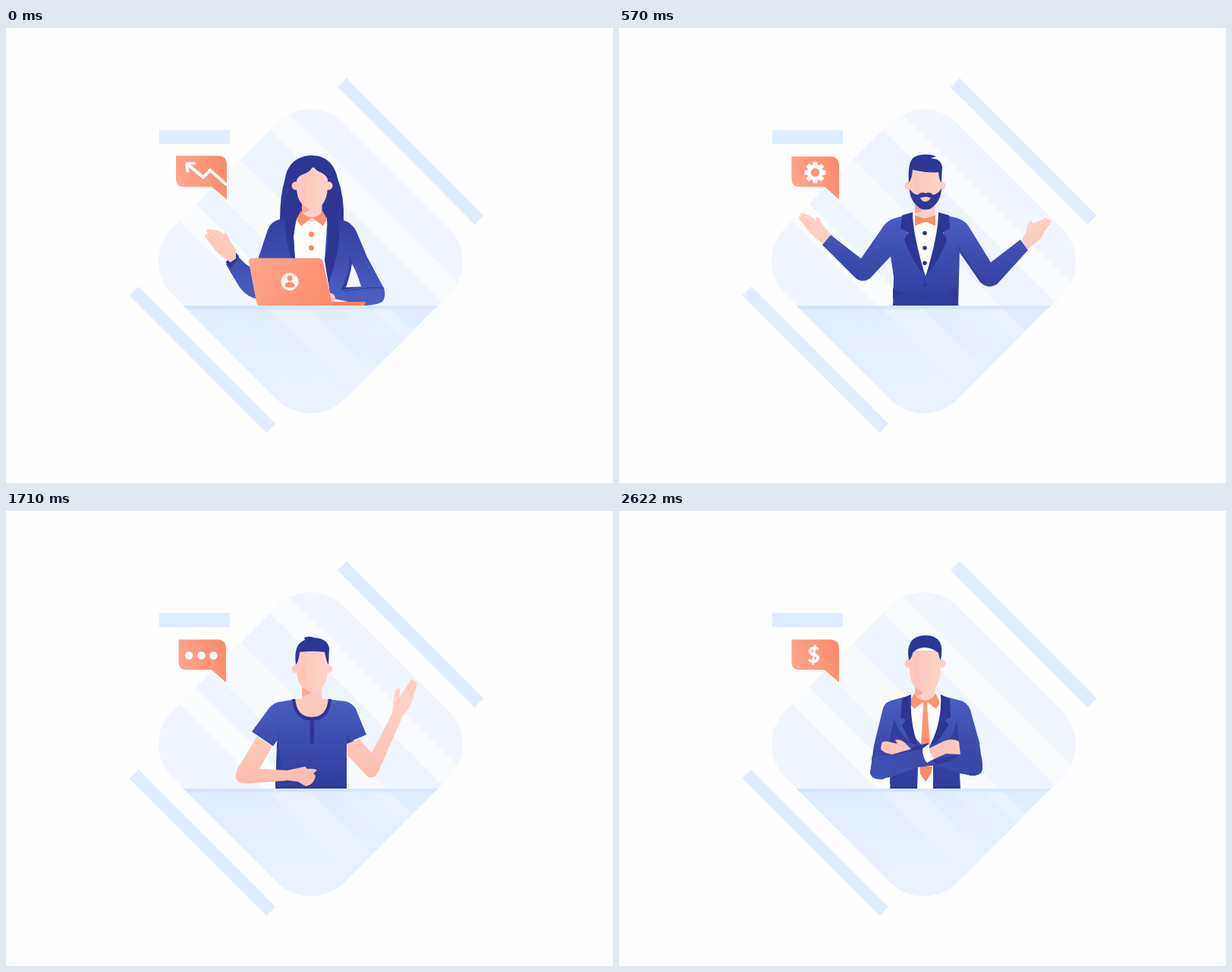
Write an HTML page with a canvas that moves like this. It is 800 by 600 pixels and loops after 2850 ms.

```html
<!DOCTYPE html>
<html lang="en">
<head>
<meta charset="utf-8">
<title>Desk people</title>
<style>
html, body { margin: 0; width: 100%; height: 100%; overflow: hidden; background: #fefefe; }
canvas { display: block; }
</style>
</head>
<body>
<canvas id="stage" width="800" height="600"></canvas>
<script>
const ctx = document.getElementById('stage').getContext('2d');
const HOLD = 570;
const WHITE = '#fefefe', NAVY = '#2e3694', PALE = '#e0edfe';
const DESK_Y = 366;

function grad(x0, y0, c0, x1, y1, c1) {
  const g = ctx.createLinearGradient(x0, y0, x1, y1);
  g.addColorStop(0, c0);
  g.addColorStop(1, c1);
  return g;
}

const blue = grad(0, 245, '#4b5fc0', 0, 366, '#2f3a9b');
const blueUp = grad(0, 250, '#343d9e', 0, 366, '#4d62c5');
const hair = grad(0, 165, '#2b3796', 0, 250, '#303693');
const skin = grad(383, 0, '#fdc6b9', 424, 0, '#fed4cb');
const shade = grad(384, 0, '#fdccc1', 402, 0, '#fcbfb0');
const arm = grad(0, 250, '#fed2c8', 0, 355, '#fdbfae');
const orange = grad(0, 240, '#ff9a78', 0, 366, '#fa8766');
const laptop = grad(320, 304, '#ffa98f', 430, 366, '#fc8968');
const bubbleFill = grad(228, 208, '#ffa78f', 290, 180, '#fb8a6a');
const desk = grad(0, 371, '#e0edfd', 0, 508, '#ebf3fe');
const deskGlow = grad(0, 371, '#e8f1fd', 0, 480, '#f3f8fe');

function fill(color, d) {
  ctx.fillStyle = color;
  ctx.fill(new Path2D(d));
}

function line(color, width, d, cap = 'round') {
  ctx.strokeStyle = color;
  ctx.lineWidth = width;
  ctx.lineCap = cap;
  ctx.lineJoin = cap === 'round' ? 'round' : 'miter';
  ctx.stroke(new Path2D(d));
}

function dots(color, r, ...points) {
  ctx.fillStyle = color;
  for (const [x, y] of points) {
    ctx.beginPath();
    ctx.arc(x, y, r, 0, Math.PI * 2);
    ctx.fill();
  }
}

// Diagonal stripe between two values of x - y
function stripe(color, from, to) {
  ctx.save();
  ctx.translate(401.5, 307.5);
  ctx.rotate(Math.PI / 4);
  ctx.fillStyle = color;
  ctx.fillRect(-230, (94 - to) / Math.SQRT2, 460, (to - from) / Math.SQRT2);
  ctx.restore();
}

function clipDiamond() {
  const half = 160;
  ctx.translate(401.5, 307.5);
  ctx.rotate(Math.PI / 4);
  ctx.beginPath();
  ctx.roundRect(-half, -half, half * 2, half * 2, 62);
  ctx.rotate(-Math.PI / 4);
  ctx.translate(-401.5, -307.5);
  ctx.clip();
}

function drawBackdrop() {
  ctx.fillStyle = WHITE;
  ctx.fillRect(0, 0, 800, 600);
  fill(PALE, 'M202 134.5H295V153H202ZM449 66L629.500 247 617.500 259 437 78ZM174.500 341L355 522 343.500 534 162.500 352.500Z');
  ctx.save();
  clipDiamond();
  ctx.fillStyle = '#f1f6fe';
  ctx.fillRect(190, 100, 430, 420);
  stripe('#f9fbfe', 213, 260);
  stripe('#eff5fe', 135, 213);
  stripe('#f8fafe', 60, 135);
  stripe('#eff5fe', 18, 60);
  stripe('#fafcfe', -26, 18);
  ctx.restore();
}

function drawDesk() {
  ctx.save();
  clipDiamond();
  ctx.beginPath();
  ctx.rect(190, DESK_Y, 430, 150);
  ctx.clip();
  ctx.fillStyle = desk;
  ctx.fillRect(190, DESK_Y, 430, 150);
  stripe(deskGlow, -25, 30);
  stripe('#e5effd', 69, 112);
  stripe('#e9f2fd', 112, 136);
  ctx.fillStyle = grad(234, 0, '#d5e4fa', 569, 0, '#dbe9fc');
  ctx.fillRect(190, DESK_Y, 430, 5);
  ctx.restore();
}

function drawBubble(left = 227.5, top = 169.5, right = 290) {
  fill(bubbleFill, `M${left} ${top}H${right - 12}Q${right} ${top} ${right} ${top + 12}V226L271 209.500H${left + 11}Q${left} 209.500 ${left} 199Z`);
}

function drawHead(earY = 208) {
  dots('#fdc9bd', 5.5, [382, earY]);
  dots('#fed1c7', 5.5, [425, earY]);
  fill('#fed0c6', 'M390 225H416.500V252Q403 262 390 252Z');
  fill('#fca992', 'M390 229L401 239Q396 244 390 244Z');
  fill(skin, 'M384 184H424V211Q423 226 416 234Q409 241 401 239Q391 236 386 226Q383 219 383 208Z');
  fill(shade, 'M384 186H396Q390 194 392 202L396 212Q397 223 390 231Q383 222 383 208Z');
}

function drawCollar() {
  fill('#fd936f', 'M389 241Q384 248 383.500 254L389 261 403.500 250 418 261 422.500 253Q421 246 417 241Q413 249 403.500 250Q393 249 389 241Z');
}

function womanWithLaptop() {
  drawBubble(224, 168.5, 291);
  line(WHITE, 4, 'M239 179.500L260 197 269 187.500 291 207', 'butt');
  line(WHITE, 3.6, 'M239.500 189L238 178.500 248.500 178.500');

  fill(hair, 'M361 254Q361 220 368 198C371 178 386 168 403 168C421 168 433 179 437 198Q446 222 445 254Z');
  drawHead();
  fill(hair, 'M382 203V184L405 172 425 184V203Q423 194 416 191Q407 188 405 181Q402 189 394 192Q385 194 382 203Z');
  fill(WHITE, 'M382 249L403 256 424 249 430 306H379Z');
  drawCollar();
  dots('#fb845f', 3.4, [402.5, 272], [402.5, 290]);

  fill(blueUp, 'M383 248L362 252Q350 254 345 266L331 308H381L379 275Z');
  fill(blueUp, 'M424 248L443 253Q457 257 462 269L476 302 498 343Q501 352 497 360Q492 365 473 366L428 356 420 306Z');
  fill(NAVY, 'M368 251L385 247Q379 262 379 276L381 305H376Q367 276 368 251Z');
  fill(NAVY, 'M422 247L438 252Q441 272 437 294Q432 319 425 336L420 306Q428 276 422 247Z');
  fill('#333b9b', 'M455 280Q452 302 456 312L468 341 441 346Q452 326 453 307Z');
  fill('#f4f8fe', 'M456 311Q453 328 448 342L468 341Q463 323 456 311Z');
  line('#333c9b', 1.2, 'M498 343Q478 341 447 347');

  fill(blueUp, 'M302 296Q313 312 329 319L334 358Q318 356 308 342L290 312Z');
  fill(NAVY, 'M302 295L307 301 296 317 289.500 309Z');
  fill(arm, 'M289 304Q279 298 272 288L262 275Q262 271 266 271L264 267Q266 264 272 266Q281 265 288 273L287 270Q291 269 295 280L303 292V304L296 309Z');
  line('#fcb9a9', .8, 'M266 271L278 281M270 267L283 278M265 276L275 284');

  fill('#fdc3b5', 'M425 350Q432 348 434 356L432 363H426Z');
  fill('#f97f5d', 'M428 361H474Q474 366 469 366.500H428Z');
  fill(laptop, 'M324 303.500H411Q417 303.500 418 309L430.500 366.500H334Q331 366 330 361L320 309Q319.500 304 324 303.500Z');
  dots('#fff4ef', 11.5, [374, 334.5]);
  dots('#fb906f', 3.4, [374, 330]);
  fill('#fb906f', 'M367.500 340Q368 335 374 335Q380 335 380.500 340Q377 343 374 342Q370 343 367.500 340Z');
}

function drawGear(x, y) {
  ctx.save();
  ctx.translate(x, y);
  ctx.fillStyle = WHITE;
  for (let i = 0; i < 8; i++) {
    ctx.fillRect(-3, -14, 6, 7);
    ctx.rotate(Math.PI / 4);
  }
  ctx.strokeStyle = WHITE;
  ctx.lineWidth = 5;
  ctx.beginPath();
  ctx.arc(0, 0, 8.2, 0, Math.PI * 2);
  ctx.stroke();
  ctx.restore();
}

function manWithBowTie() {
  drawBubble();
  drawGear(258.5, 190.5);

  fill(arm, 'M272 287L260 278Q252 271 246 263L237 251Q236 248 240 248L239 245Q242 243 247 246Q256 248 260 255L259 250Q263 247 267 257L276 269 283 274Z');
  fill(arm, 'M531 279L537 268Q537 259 543 254L546 258 563 250 565 253Q570 251 569 256L560 270Q556 280 544 287L538 293Z');
  line('#fcb5a4', .8, 'M240 248L253 258M239 252L251 262M566 254L553 264M568 258L556 268');

  drawHead();
  fill(hair, 'M382 204Q380 178 388 171Q395 166 410 167L418 169 411 172Q424 172 426 183L425 204Q422 201 421 190Q410 192 387 187Q386 199 382 204Z');
  fill('#303996', 'M383 212Q387 219 394 220Q398 215 404 218Q410 215 414 220Q421 219 425 211Q425 228 411 238Q404 241 397 238Q383 228 383 212Z');
  fill('#fdc9be', 'M397 224Q404 221 411 224Q408 229 404 229Q399 229 397 224Z');
  fill(WHITE, 'M385 246L403 252 422 246 425 280 404 330 381 280Z');

  fill(blue, 'M387 244L363 251Q352 254 346 265L319 304 279 273 268 286 310 328Q320 338 331 330L358 301 362 328 361 367H447L449 294 476 335Q486 345 498 338L539 293 529 279 490 309 463 265Q458 255 447 251L421 244 428 270 404 328 380 270Z');
  fill('#303897', 'M361 343Q367 349 382 349Q366 351 361 357ZM446 344Q441 350 426 351Q441 352 446 357Z');
  line('#343f9f', 1.2, 'M404 328V366');
  line('#3d4cac', 1.5, 'M280 275L318 307 358 290');
  fill('#343f9f', 'M446 284L452 296 482 337 476 335 449 296Z');
  fill(NAVY, 'M373 247L387 243Q387 272 404 328Q385 306 376 279L381 270 371 264Z');
  fill(NAVY, 'M435 247L421 243Q421 272 404 328Q423 306 432 279L427 270 436 264Z');
  fill('#fd8e69', 'M390 247L402 251H406L417 247V261L406 256H402L390 261Z');
  dots(NAVY, 2.8, [403, 270.5], [403, 290], [403, 310], [403.5, 339], [403.5, 354]);
}

function womanWithCup() {
  drawBubble();
  line(WHITE, 5.2, 'M247 189L254.500 198 269 183.500', 'butt');

  fill(hair, 'M403 156C386 156 378 167 376 185Q372 207 364 224Q361 234 372 238Q403 242 435 238Q444 235 441 226Q433 207 430 181C427 164 417 156 403 156Z');
  fill('#fdc5b7', 'M390 215H415V240L424 250 404 273 382 250 390 240Z');
  fill('#fdb09b', 'M390 217Q398 226 409 223Q400 235 390 235Z');
  dots('#fed0c6', 5.5, [423.5, 191.5]);
  fill(skin, 'M407 167Q411 176 422 180L424 195Q423 217 406 224Q397 227 390 218Q383 208 383 195L376 193Q398 188 407 167Z');
  fill(shade, 'M377 193Q391 190 396 183L393 194 397 204Q397 214 390 218Q383 208 383 196Z');
  line('#303b99', 1.2, 'M407 167Q405 176 400 181');

  fill(arm, 'M481 319L499 304 521 282Q523 265 530 263L532 269 545 258Q553 257 551 267Q548 279 537 286L490 343Q485 349 478 346Z');
  line('#fcb5a4', .8, 'M533 270L528 275M550 262L540 271');
  fill(blue, 'M378 243L358 248Q349 252 344 262L316 323Q335 324 351 307L355 293 361 325 364 367H442L444 333 452 306 472 343Q477 350 481 346L485 320 463 264Q458 250 447 247L428 243 404 271Z');
  fill('#2e3896', 'M354 292Q348 307 360 313L357 299ZM452 279Q446 304 454 307L474 346 482 347Q466 319 452 279Z');
  fill('#2c338f', 'M406 313Q420 308 437 311L449 300Q446 322 443 341L442 367H425Q437 350 436 333Q433 320 420 319Q407 319 406 313Z');
  fill(orange, 'M389 233Q380 241 377 249L385 270 391 260 403 270Q389 254 389 233Z');
  fill(orange, 'M415 233Q425 239 428 247L424 270 416 260 404 270Q416 254 415 233Z');

  fill(arm, 'M316 322Q312 332 313 340Q316 348 328 346L374 305 390 300Q401 300 403 293L402 277 396 281 400 273Q397 270 391 275L375 289 353 308Q335 323 316 322Z');
  line('#fcb5a4', 1, 'M392 280L402 278M391 287L402 286M391 294L401 293');
  line('#b5d1f5', 2.4, 'M405 280H401V294H405');
  fill(grad(403, 275, '#a0c3ed', 423, 300, '#c9e0fc'), 'M403 275H423V296Q423 300 419 300H407Q403 300 403 296Z');
}

function manInTShirt() {
  drawBubble();
  dots(WHITE, 5.2, [241, 190.5], [257.5, 190.5], [273.5, 190.5]);

  drawHead();
  fill(hair, 'M382 203Q379 179 390 172L394 170 393 167Q400 164 406 167Q424 168 426 181L425 203Q422 198 420 186Q403 184 387 186Q386 198 382 203Z');
  fill('#fdcabe', 'M390 240H416V248H427Q424 273 403 273Q381 273 379 248H390Z');
  fill('#fca992', 'M390 232L402 240Q396 244 390 244Z');

  fill(arm, 'M449 306L466 301 482 319 509 267Q510 248 514 235L519 234 518 247 533 223Q538 221 538 224Q543 224 541 231L536 249Q532 260 523 270L490 345Q485 354 476 350L450 322Z');
  line('#fcb5a4', .8, 'M536 225L526 242M541 230L531 246M518 248L515 255');
  fill(blue, 'M377 249L359 252Q351 254 346 261L324 291 352 310 358 302 355 367H449V306L475 295 461 261Q457 254 448 251L429 249Q427 275 403 275Q379 275 377 249Z');
  fill('#323d9c', 'M360 287Q357 307 363 333Q361 353 355 366L357 307ZM449 285Q447 301 459 303L449 307Z');
  line(NAVY, 4.5, 'M379 248Q381 274 403 274Q425 274 427 248', 'butt');
  fill(NAVY, 'M400.500 275H406V307H400.500Z');
  fill(arm, 'M331 297L305 340Q300 351 306 357Q312 360 324 359L370 355 385 357 395 363Q406 361 408 349L405 346 410 342Q407 339 397 340L394 337 371 342 334 340 351 310Z');
  line('#fcb09d', 1, 'M307 354Q324 359 370 355M397 345L406 347M395 351L406 352');
}

function manInTie() {
  drawBubble();
  ctx.fillStyle = WHITE;
  ctx.font = '900 28px Lato, sans-serif';
  ctx.textAlign = 'center';
  ctx.textBaseline = 'alphabetic';
  ctx.fillText('$', 256.5, 199.5);

  drawHead(201);
  fill(hair, 'M382 197Q379 181 385 172Q391 164 404 164Q418 164 423 173Q427 181 424 197Q422 194 421 187Q412 180 403 180Q393 180 387 187Q386 194 382 197Z');
  fill(WHITE, 'M384 245L403 251 424 245 430 310 414 367H393L381 310Z');
  fill(orange, 'M400 250H407L406 257 410 309H398L401 257ZM396 337H413L411 347 404 357 397 347Z');
  drawCollar();

  fill(blue, 'M384 243L362 249Q351 251 348 260L336 309 331 345Q332 354 347 354L359 348 357 367H393L394 338 400 310 381 288Z');
  fill(blue, 'M424 243L446 249Q459 251 463 262L475 305 479 339Q479 348 467 349L449 346 450 367H414V338L409 310 430 288Z');
  fill(NAVY, 'M373 247L385 242Q383 279 394 309L385 306 373 283 378 275 371 273Z');
  fill(NAVY, 'M424 242L436 248 437 272 430 276 435 282 418 306 410 309Q426 278 424 242Z');
  fill('#333d9b', 'M363 275Q357 292 357 306H385Q370 296 363 275ZM445 277Q448 295 447 307L433 305Q441 296 445 277ZM357 351L393 337V345Q372 346 357 361ZM414 337L449 347V355Q430 342 414 345Z');

  fill(grad(332, 350, '#4053b2', 478, 315, '#3847a8'), 'M333 324L359 321 394 309 408 307 414 329 449 320 476 318Q481 334 478 343Q476 349 463 349L420 335 394 338 360 350Q341 356 333 350Z');
  fill('#303997', 'M359 322L394 309 408 306 402 314Q384 317 359 322ZM414 329L449 321 436 330 420 335Z');
  fill(arm, 'M346 307Q347 303 354 304L367 307 364 302Q371 300 377 306L385 314 360 321Q348 319 345 314Z');
  line('#fcaf9c', .8, 'M347 308L357 311M346 312L356 315M366 307L376 311');
  fill(arm, 'M409 313L429 303Q441 299 448 304L450 321 431 320 413 328Z');
  fill(WHITE, 'M400 313L409 307Q408 319 415 327L406 332Q400 326 400 313Z');
}

const scenes = [womanWithLaptop, manWithBowTie, womanWithCup, manInTShirt, manInTie];

function render() {
  const index = Math.floor(performance.now() / HOLD) % scenes.length;
  drawBackdrop();
  scenes[index]();
  drawDesk();
  requestAnimationFrame(render);
}
render();
</script>
</body>
</html>
```
